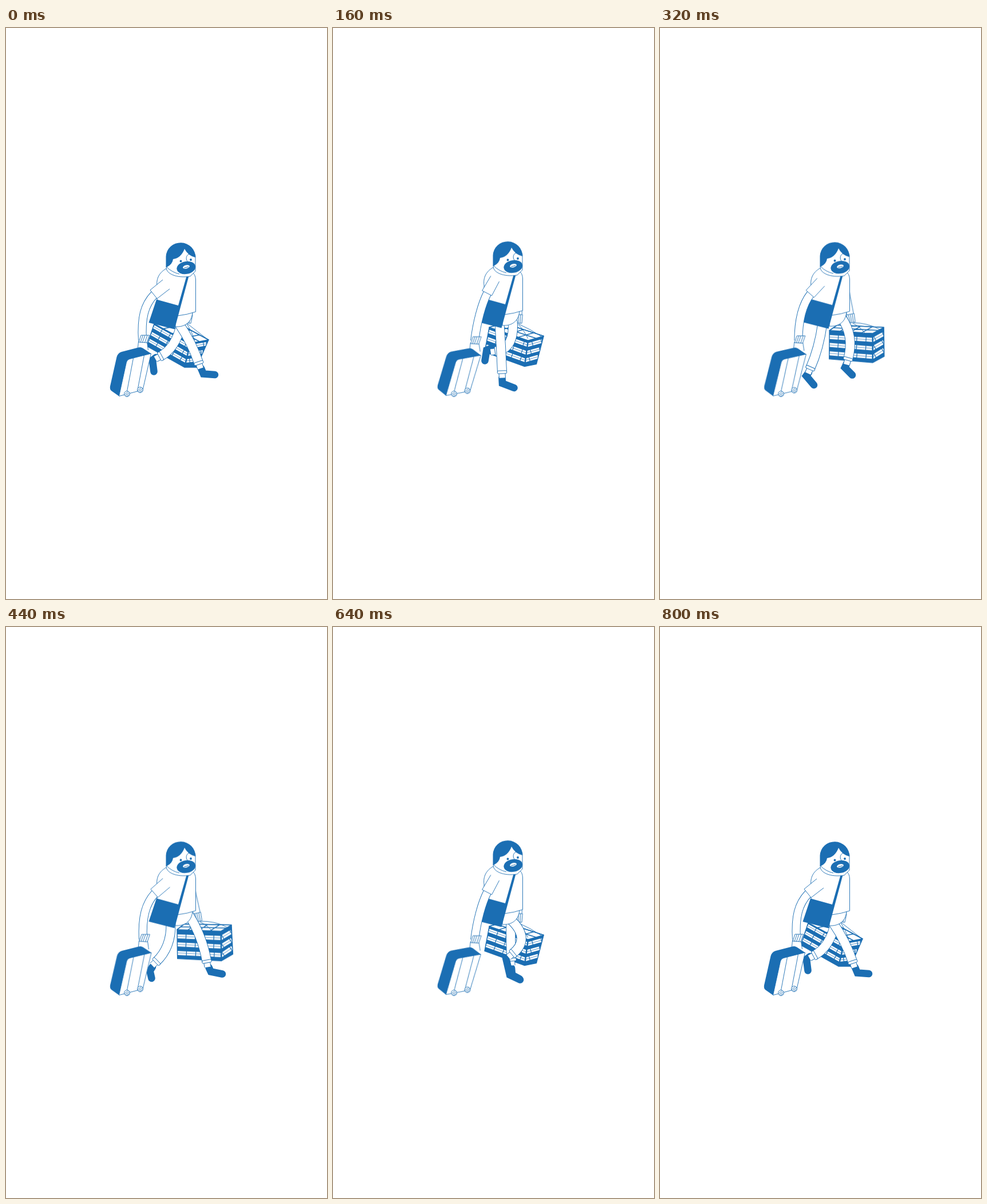
Write an HTML page without scripts that moves like this. It is 561 px wide and 998 px high and loops after 840 ms.

```html
<!DOCTYPE html>
<html lang="en">
<head>
<meta charset="utf-8">
<title>Traveller</title>
<style>
  html, body { margin: 0; width: 100%; height: 100%; overflow: hidden; background: #fff; }
  svg { display: block; width: 100%; height: 100%; --ink: #1b6eb3; }
  svg * { animation-duration: 840ms; animation-iteration-count: infinite; }

  .line { fill: none; stroke: var(--ink); stroke-width: .9; }
  .paper { fill: #fff; stroke: var(--ink); stroke-width: .9; stroke-linejoin: round; }
  .ink { fill: var(--ink); }
  .white { fill: none; stroke: #fff; }

  /* Two sways per loop, drawn on 40 ms steps of a cosine */
  .bob, .sag, .case, .arm, .hand, .sleeve {
    animation-timing-function: linear(0 0% 20%, .095 20% 40%, .345 40% 60%, .655 60% 80%, .905 80% 100%, 1 100%);
  }
  .bob { animation-name: bob; }
  .sag { animation-name: sag; }
  .case { animation-name: tilt; transform-origin: 212px 640px; }
  .arm { animation-name: arm; }
  .hand { animation-name: hand; }
  .sleeve { animation-name: sleeve; }
  @keyframes bob {
    0%, 47.61%, 95.23%, 100% { transform: none; }
    23.8%, 71.42% { transform: translateY(-2.4px); }
  }
  @keyframes sag {
    0%, 47.61%, 95.23%, 100% { transform: none; }
    23.8%, 71.42% { transform: translateY(2.2px); }
  }
  @keyframes tilt {
    0%, 47.61%, 95.23%, 100% { transform: rotate(0deg); }
    23.8%, 71.42% { transform: rotate(4.4deg); }
  }
  @keyframes arm {
    0%, 47.61%, 95.23%, 100% { d: path('M259 466C242 484 236 506 238.5 546'); }
    23.8%, 71.42% { d: path('M271 463C262 482 253 515 248.5 547'); }
  }
  @keyframes hand {
    0%, 47.61%, 95.23%, 100% { transform: none; }
    23.8%, 71.42% { transform: translate(9.5px, 2.8px); }
  }
  @keyframes sleeve {
    0%, 47.61%, 95.23%, 100% { d: path('M274 440L252 458L264 473L286 456'); }
    23.8%, 71.42% { d: path('M276 435L261.5 461.5L279 469.5L291 444'); }
  }

  /* One swing per loop */
  .far-arm, .box, .top, .rows, .thick, .edge, .handle {
    animation-timing-function: linear(0 0% 10%, .024 10% 20%, .095 20% 30%, .206 30% 40%, .345 40% 50%,
      .5 50% 60%, .655 60% 70%, .794 70% 80%, .905 80% 90%, .976 90% 100%, 1 100%);
  }
  .far-arm { animation-name: swing; transform-origin: 325px 462px; }
  .box { animation-name: box; }
  .top { animation-name: top; }
  .rows { animation-name: rows; }
  .thick { animation-name: rows, thick; }
  .edge { animation-name: edge; }
  .handle { animation-name: handle; }
  @keyframes swing {
    0%, 95.23%, 100% { transform: rotate(8.5deg); }
    47.61% { transform: rotate(-13deg); }
  }
  @keyframes box {
    0%, 95.23%, 100% { d: path('M259 517L246 556L312 593L333 593L354 545L291 511Z'); }
    47.61% { d: path('M300 529L301 580L378 583L398 571L395 520L312 519Z'); }
  }
  @keyframes top {
    0%, 95.23%, 100% { d: path('M259 517L322 551L354 545L291 511ZM275 514L338 548M275 525.5L307 519.5M290.5 534L322.5 528M306 542.5L338 536.5'); }
    47.61% { d: path('M300 529L377 531L395 520L312 519ZM306 524L386 525.5M319 529.5L333 519M338.5 530L353.5 519.5M358 530.5L374 520'); }
  }
  @keyframes rows {
    0%, 95.23%, 100% { d: path('M258 522L321 557L350 552M254 534L317 570L344 566M250 546L314 582L338 579'); }
    47.61% { d: path('M300 541L377 543L395 532M300 555L377 558L396 546M301 570L378 573L397 560'); }
  }
  @keyframes thick {
    0%, 95.23%, 100% { stroke-width: 6px; }
    47.61% { stroke-width: 7.1px; }
  }
  @keyframes edge {
    0%, 95.23%, 100% { d: path('M322 551L312 593'); }
    47.61% { d: path('M377 531L378 583'); }
  }
  @keyframes handle {
    0%, 95.23%, 100% { d: path('M316 516Q335 531 352 544M316 517Q324 529 330 546'); }
    47.61% { d: path('M340 514Q366 513 387 524M339 515Q352 520 361 531'); }
  }

  /* Legs: hip, knee bend, trouser end; shoes: ankle, heel, toe */
  .leg { fill: none; stroke: var(--ink); stroke-width: 17px; }
  .leg.fill { stroke: #fff; stroke-width: 15.2px; marker-end: url(#cuff); }
  .shoe { fill: none; stroke: var(--ink); stroke-width: 12.6px; stroke-linecap: round; stroke-linejoin: miter; }
  .near .leg { animation-name: near-leg; }
  .near .shoe { animation-name: near-shoe; }
  .far .leg { animation-name: far-leg; }
  .far .shoe { animation-name: far-shoe; }
  @keyframes near-leg {
    0%     { d: path('M303 518Q325 550 337 586'); animation-timing-function: steps(4); }
    19.04% { d: path('M291 516Q294 560 295.5 602'); animation-timing-function: steps(4); }
    38.09% { d: path('M284 516Q278 560 262.5 595'); animation-timing-function: steps(3); }
    52.38% { d: path('M288 518Q289 560 262.5 585'); animation-timing-function: steps(2); }
    61.9%  { d: path('M306 516Q318 553 286 575'); animation-timing-function: steps(3); }
    76.19% { d: path('M311 512Q346 545 314 571'); animation-timing-function: steps(4); }
    95.23%, 100% { d: path('M303 518Q325 550 337 586'); }
  }
  @keyframes near-shoe {
    0%     { d: path('M341 595L345 604.5L365 606'); animation-timing-function: steps(4); }
    19.04% { d: path('M295.5 612L296 621L316.5 629'); animation-timing-function: steps(4); }
    38.09% { d: path('M260 602L255.5 608L269 624'); animation-timing-function: steps(3); }
    52.38% { d: path('M256 594L251.5 601L254.5 614'); animation-timing-function: steps(2); }
    61.9%  { d: path('M279 578L273 583L278.5 604'); animation-timing-function: steps(3); }
    76.19% { d: path('M302 578L309 608L327 616.5'); animation-timing-function: steps(4); }
    95.23%, 100% { d: path('M341 595L345 604.5L365 606'); }
  }
  @keyframes far-leg {
    0%     { d: path('M306 518Q297 559 269.5 574'); animation-timing-function: steps(4); }
    19.04% { d: path('M314 512Q318 560 285 565'); animation-timing-function: steps(4); }
    38.09% { d: path('M317 506Q340 538 328.5 579'); animation-timing-function: steps(3); }
    52.38% { d: path('M320 504Q343 540 351 585'); animation-timing-function: steps(2); }
    61.9%  { d: path('M317 511Q326 550 326.5 590'); animation-timing-function: steps(3); }
    76.19% { d: path('M311 512Q310 550 312 582'); animation-timing-function: steps(4); }
    95.23%, 100% { d: path('M306 518Q297 559 269.5 574'); }
  }
  @keyframes far-shoe {
    0%     { d: path('M262 576L256 580.5L258.5 600.5'); animation-timing-function: steps(4); }
    19.04% { d: path('M276 560L268.5 563L265.5 581.5'); animation-timing-function: steps(4); }
    38.09% { d: path('M326 587L323 593.5L336 606.5'); animation-timing-function: steps(3); }
    52.38% { d: path('M354.5 595L358 602.5L378 606.5'); animation-timing-function: steps(2); }
    61.9%  { d: path('M327.5 599L329 607L348 613.5'); animation-timing-function: steps(3); }
    76.19% { d: path('M312 596L313 608L326 615'); animation-timing-function: steps(4); }
    95.23%, 100% { d: path('M262 576L256 580.5L258.5 600.5'); }
  }
</style>
</head>
<body>
<svg viewBox="0 0 561 998" xmlns="http://www.w3.org/2000/svg">
  <defs>
    <marker id="cuff" orient="auto" markerUnits="userSpaceOnUse" markerWidth="30" markerHeight="30" viewBox="-15 -15 30 30" overflow="visible">
      <path fill="#fff" d="M0-5.5H9.5V5.5H0Z"/>
      <path class="line" d="M0-5.5H9.5M0 5.5H9.5"/>
      <rect class="paper" x="-3" y="-8.2" width="5" height="16.4" rx="2"/>
    </marker>
    <g id="wheel">
      <circle class="paper" r="4.9"/>
      <path class="line" d="M-4 1L2-4M-3 3L4-2M-1 4.5L4 1"/>
    </g>
  </defs>

  <!-- checked bag -->
  <g class="sag">
    <path class="box ink"/>
    <path class="thick white" stroke-dasharray="15 1.2"/>
    <path class="rows line" style="stroke-width:.7px"/>
    <path class="top paper" style="stroke-width:1.5px"/>
    <path class="edge line" style="stroke-width:2.5px"/>
    <path class="box line" style="stroke-width:1.4px"/>
    <path class="handle line"/>
  </g>

  <g class="far-arm">
    <path class="paper" d="M319 462V502H331V462"/>
    <path class="paper" d="M318 501H332L331 516H320Z"/>
    <path class="line" d="M321.5 501L322.5 516M325 501V516M328.5 501L328 516"/>
  </g>

  <g class="far">
    <path class="shoe"/><path class="leg"/><path class="leg fill"/>
  </g>
  <g class="near">
    <path class="shoe"/><path class="leg"/><path class="leg fill"/>
  </g>

  <g class="bob">
    <path class="paper" d="M296 500V522C312 523 325 515 326 496Z"/>
    <path class="paper" d="M283 419C268 426 262 438 264 452V476L302 487L300 503Q317 501 331.5 496V440Q331 430 325 427Z"/>
    <path class="ink" d="M263 474.5L301 485L316 432L320.5 430L294.5 526.5L249.5 515Z"/>
    <!-- head -->
    <path class="paper" d="M280.5 416C277 429 298 438 322 434L331 425V398Q329 384 306 380Q282 384 280.5 398Z"/>
    <path class="line" d="M281 418Q290 427 303 430"/>
    <path class="ink" d="M279.5 418V399.5A25.7 25 0 0 1 331 401Q318 398 312 386Q306 402 292 404Q291 413 281 418Z"/>
    <path class="line" d="M320 395C313 398 314 408 320 410"/>
    <circle class="ink" cx="305.5" cy="407.5" r="1.9"/>
    <circle class="ink" cx="323" cy="405" r="1.9"/>
    <ellipse class="ink" cx="314.8" cy="419" rx="16.5" ry="11" transform="rotate(-10 314.8 419)"/>
    <g transform="rotate(-14 315 417.5)">
      <ellipse fill="#fff" cx="315" cy="417.5" rx="6" ry="3"/>
      <path class="line" d="M311 418.3H319"/>
    </g>
  </g>

  <!-- near arm -->
  <path class="arm line" style="stroke-width:15px"/>
  <path class="arm white" stroke-width="13.2"/>
  <g class="bob"><path class="sleeve paper"/></g>

  <!-- suitcase -->
  <g class="hand">
    <path class="paper" d="M230 563L231.5 548L246.5 549L248.5 563"/>
    <path class="paper" d="M236 537H250.5L246 550L232 549Z"/>
    <path class="line" d="M239.5 537L235 549.5M243 537L238.5 549.5M247 537L242.5 550"/>
  </g>
  <g class="case">
    <path class="ink" d="M197.5 643.5L184 634Q181 631 182 626L193.5 575Q195.5 568 202 566L231 558.5Q235.5 557 239 559.5L253.5 569L240 600Z"/>
    <path class="paper" d="M197.5 643.5L210.5 584Q212 579.5 216 578.5L253.5 569L239 632.5Z"/>
    <path class="line" d="M222.5 577L210.5 640M241.5 572L229.5 635"/>
    <use href="#wheel" x="211.5" y="639.5"/>
    <use href="#wheel" x="234.5" y="632.5"/>
  </g>
</svg>
</body>
</html>
```
